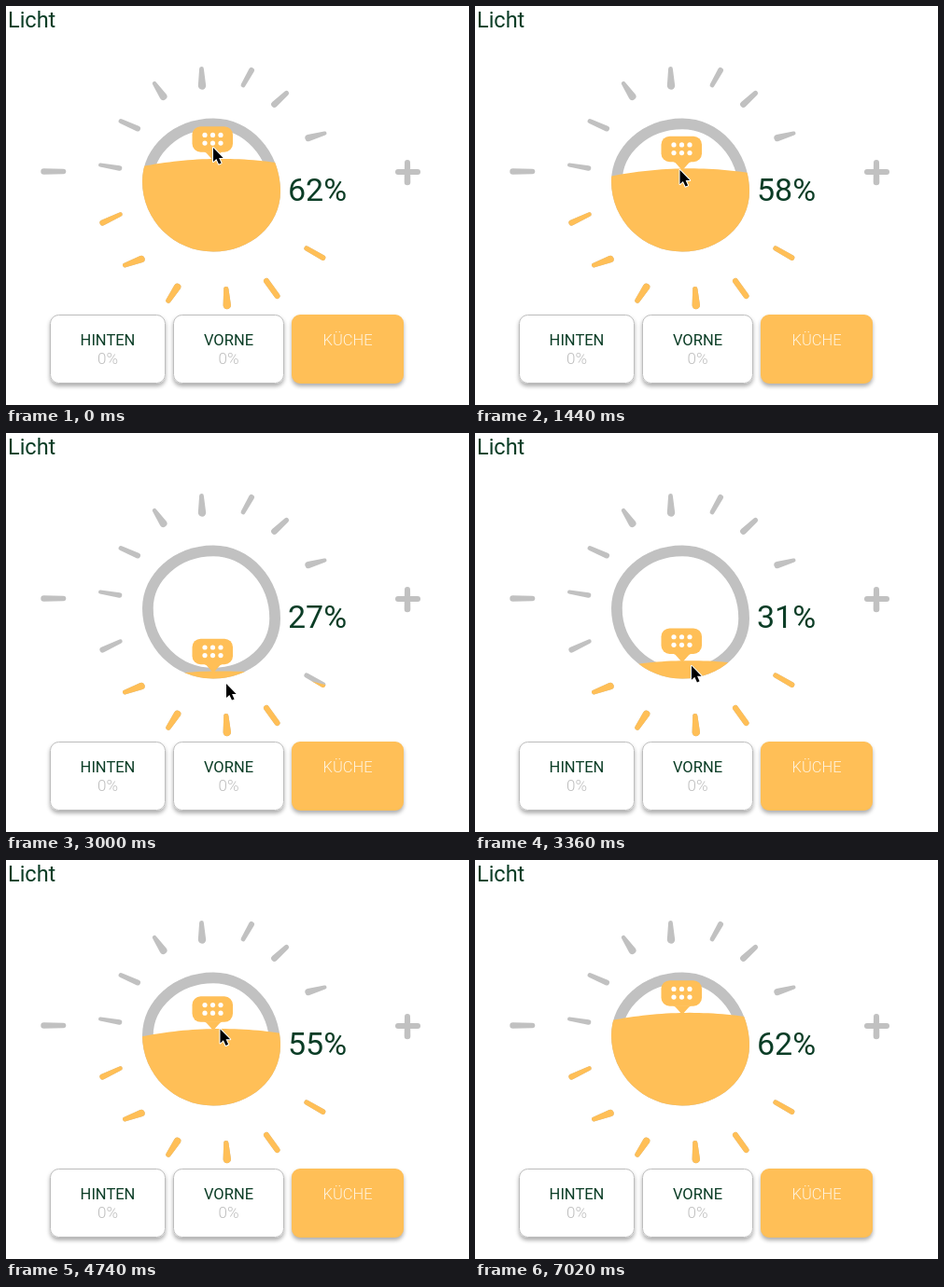
An HTML page with a canvas for the animation above (7.38 s loop, 496 by 428 pixels).

```html
<!DOCTYPE html>
<html lang="de">
<head>
<meta charset="utf-8">
<title>Licht</title>
<style>
html, body { margin: 0; width: 100%; height: 100%; overflow: hidden; background: #fff; }
canvas { display: block; }
</style>
</head>
<body>
<canvas id="stage" width="496" height="428"></canvas>
<script>
const ctx = document.getElementById('stage').getContext('2d');
const LOOP = 7380, STEP = 60;
const GRAY = '#c1c1c1', ORANGE = '#ffbf57', GREEN = '#0b3d26';

// time, brightness in percent
const levelKeys = [
  [0, 62], [1260, 62], [1440, 58], [1860, 43.4], [1980, 40], [2400, 23], [2640, 28],
  [2760, 27.2], [2940, 27.2], [3000, 27], [3180, 22], [3720, 64.3], [3780, 66],
  [4020, 73.4], [4140, 73.4], [4500, 43], [4920, 66], [5040, 68], [5340, 60],
  [5700, 63], [5880, 63], [6000, 64.9], [6120, 64.3], [6300, 64.3], [6540, 62], [7380, 62]
];
// time, pointer x, pointer y
const cursorKeys = [
  [0, 222, 152], [60, 228, 146], [120, 216, 149], [180, 209, 151], [300, 209, 151],
  [840, 274, 236], [1110, 258, 244], [1260, 221, 164], [1440, 219.5, 176], [1980, 226, 227],
  [2400, 236, 286], [2640, 238, 272], [2760, 236, 268], [2940, 236, 268], [3000, 236, 269],
  [3180, 235, 287], [3720, 223, 127], [3780, 222, 123], [4020, 225, 102], [4140, 225, 102],
  [4500, 228, 236], [4920, 230, 134], [5040, 230, 124], [5340, 231, 146], [5700, 233, 138],
  [5880, 233, 138], [6000, 232, 132], [6120, 231, 134], [6300, 231, 134], [6540, 232, 150],
  [7020, 250, 432], [7380, 250, 432]
];
// start x, y, radius; end x, y, radius
const rays = [
  [209.5, 67.5, 2.4, 210, 85.5, 4.2], [263, 69, 3, 254, 85, 2.4],
  [159, 83, 2.2, 168.5, 97, 4], [300.5, 93.5, 2.6, 287.5, 105.5, 3.4],
  [123, 123.5, 2.4, 141, 131.5, 3], [341.5, 136.5, 2, 324, 141.5, 3.7],
  [101, 170.5, 2, 121.5, 174, 2.8], [122.5, 223.5, 2.2, 103.5, 232.5, 3.1],
  [145, 271.5, 3.7, 127.5, 278, 2.5], [183.5, 301.5, 3.8, 174, 316, 2.7],
  [235.8, 303.5, 2.6, 236.8, 321, 4.2], [279, 295, 3, 290.5, 311, 3],
  [322, 260, 2.6, 339.5, 270, 2.8]
];

function slope(keys, i, k) {
  if (i < 1 || i > keys.length - 2) return 0;
  const [a, b, c] = [keys[i - 1], keys[i], keys[i + 1]];
  const before = (b[k] - a[k]) / (b[0] - a[0]), after = (c[k] - b[k]) / (c[0] - b[0]);
  return before * after > 0 ? 2 * before * after / (before + after) : 0;
}

// monotone cubic through the keys
function sample(keys, t, k) {
  let i = 0;
  while (i < keys.length - 2 && t >= keys[i + 1][0]) i++;
  const a = keys[i], b = keys[i + 1], span = b[0] - a[0], u = (t - a[0]) / span;
  const ease = u * u * (3 - 2 * u);
  return a[k] + (b[k] - a[k]) * ease +
    span * u * (1 - u) * ((1 - u) * slope(keys, i, k) - u * slope(keys, i + 1, k));
}

function taper(x1, y1, r1, x2, y2, r2) {
  const a = Math.atan2(y2 - y1, x2 - x1), q = Math.PI / 2;
  ctx.beginPath();
  ctx.arc(x1, y1, r1, a + q, a - q);
  ctx.arc(x2, y2, r2, a - q, a + q);
  ctx.closePath();
  ctx.fill();
}

function roundBox(x, y, w, h, r) {
  ctx.beginPath();
  ctx.roundRect(x, y, w, h, r);
}

function text(str, x, y, size, color, align = 'left', weight = 400) {
  ctx.font = `${weight} ${size}px Roboto, sans-serif`;
  ctx.textAlign = align;
  ctx.fillStyle = color;
  ctx.fillText(str, x, y);
}

const disc = new Path2D(`M222 120.5 C262 120.5 294 156 294 199 C294 235 262 263.5 222 263.5
  C180 263.5 146 230 146 188 C146 151 180 120.5 222 120.5 Z`);

function drawSun(surface) {
  ctx.fillStyle = GRAY;
  rays.forEach(r => taper(...r));
  ctx.save();
  ctx.clip(disc);
  ctx.strokeStyle = GRAY;
  ctx.lineWidth = 23.5;
  ctx.stroke(disc);
  ctx.restore();

  ctx.save();
  ctx.beginPath();
  ctx.moveTo(80, 330);
  for (let x = 80; x <= 360; x += 5) ctx.lineTo(x, surface + 0.00116 * (x - 230) ** 2);
  ctx.lineTo(360, 330);
  ctx.clip();
  ctx.fillStyle = ORANGE;
  rays.forEach(r => taper(...r));
  ctx.fill(disc);
  ctx.restore();
}

function drawHandle(surface) {
  const top = surface - 34.7;
  ctx.fillStyle = ORANGE;
  roundBox(199.5, top, 43.5, 27.5, 9);
  ctx.fill();
  ctx.beginPath();
  ctx.moveTo(212, top + 27);
  ctx.quadraticCurveTo(215, top + 28, 217, top + 31);
  ctx.lineTo(220.5, top + 35);
  ctx.quadraticCurveTo(222, top + 36.5, 223.5, top + 35);
  ctx.lineTo(227, top + 31);
  ctx.quadraticCurveTo(229, top + 28, 232, top + 27);
  ctx.fill();
  ctx.fillStyle = '#fff';
  for (let i = 0; i < 6; i++) {
    ctx.beginPath();
    ctx.arc(213 + 8.5 * (i % 3), top + 9.3 + 8.6 * (i > 2), 2.6, 0, 7);
    ctx.fill();
  }
}

function drawButton(x, w, label, active) {
  ctx.save();
  ctx.shadowColor = 'rgba(0,0,0,.32)';
  ctx.shadowBlur = 4;
  ctx.shadowOffsetY = 3;
  ctx.fillStyle = active ? ORANGE : '#fff';
  roundBox(x, 331, w, 74, 9);
  ctx.fill();
  ctx.restore();
  const mid = x + w / 2;
  if (!active) {
    ctx.strokeStyle = '#bdbdbd';
    ctx.lineWidth = 1;
    roundBox(x + 0.5, 331.5, w - 1, 73, 9);
    ctx.stroke();
    text('0%', mid, 384, 17, '#bdbdbd', 'center', 300);
  }
  text(label, mid, 364, 16.5, active ? '#fff3dd' : GREEN, 'center', active ? 300 : 400);
}

function drawCursor(x, y) {
  const points = [[0, 0], [0, 15], [3.4, 11.9], [6, 17.6], [8.6, 16.4], [6.1, 10.9], [10.7, 10.9]];
  ctx.beginPath();
  points.forEach(([dx, dy]) => ctx.lineTo(x + dx, y + dy));
  ctx.closePath();
  ctx.lineJoin = 'round';
  ctx.lineWidth = 2;
  ctx.strokeStyle = '#fff';
  ctx.stroke();
  ctx.fillStyle = '#000';
  ctx.fill();
}

function draw(t) {
  const level = sample(levelKeys, t, 1), surface = 326 - 2.615 * level;
  ctx.fillStyle = '#fff';
  ctx.fillRect(0, 0, 496, 428);
  text('Licht', 2, 23, 23.5, GREEN);
  drawSun(surface);
  drawHandle(surface);

  ctx.fillStyle = GRAY;
  taper(40.5, 177.5, 3.2, 61.5, 177.5, 2.8);
  taper(420, 178, 3, 441, 178, 3);
  taper(430, 168, 3, 430, 189, 3.3);

  text(Math.round(level) + '%', 302, 208.5, 34, GREEN);
  drawButton(47, 124, 'HINTEN', false);
  drawButton(179, 119, 'VORNE', false);
  drawButton(306, 120, 'KÜCHE', true);
  drawCursor(sample(cursorKeys, t, 1), sample(cursorKeys, t, 2));
}

const start = performance.now();
function tick() {
  const t = (performance.now() - start) % LOOP;
  draw(Math.floor(t / STEP) * STEP);
  requestAnimationFrame(tick);
}
tick();
</script>
</body>
</html>
```
